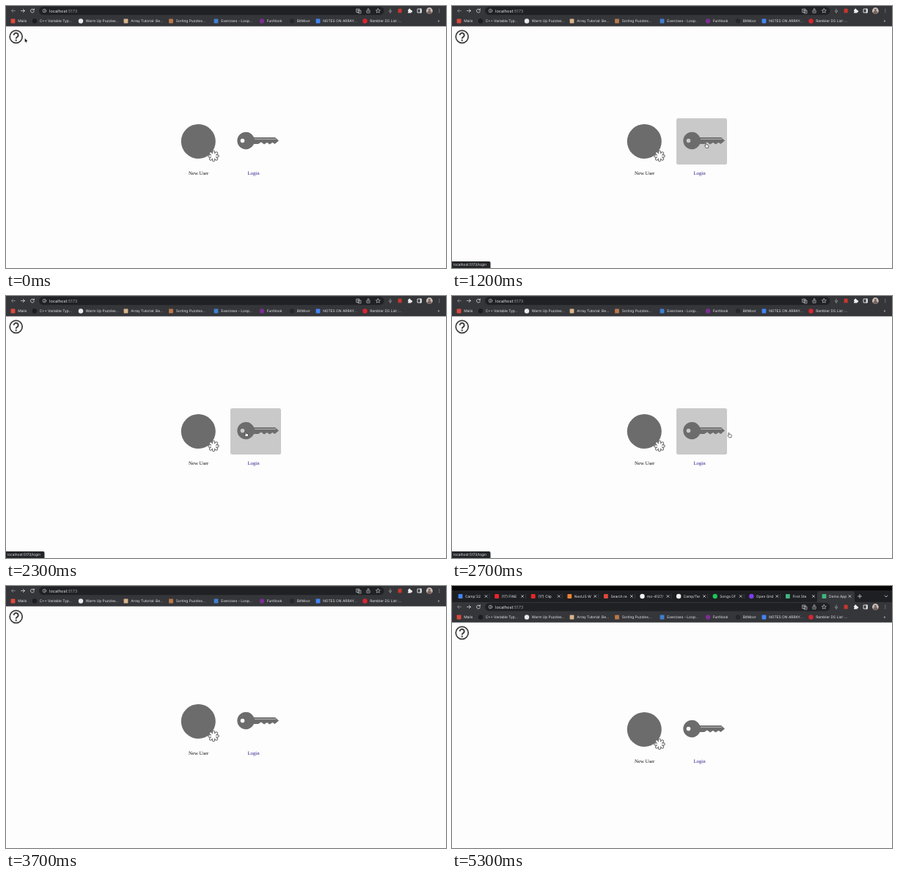
An HTML page that plays this animation: 600 by 357 pixels, repeating every 6 s.

```html
<!DOCTYPE html>
<html lang="en">
<head>
<meta charset="utf-8">
<title>Login page</title>
<style>
html, body { margin: 0; width: 100%; height: 100%; overflow: hidden; background: #fdfdfd; }
svg { display: block; width: 100%; height: 100%; }
text { font: 4.9px Inter, "Open Sans", sans-serif; fill: #e4e5e8; text-rendering: geometricPrecision; white-space: pre; }
.url { font-size: 5.7px; }
.label { font: 6.8px "Liberation Serif", "Times New Roman", serif; fill: #111; }
.link { fill: #2c1a8c; }
.line { fill: none; stroke: #d8d9dc; stroke-width: .8; stroke-linecap: round; stroke-linejoin: round; }
.dim { stroke: #8b8c90; }
.tile { fill: #c9c9c9; }
</style>
</head>
<body>
<svg viewBox="0 0 600 357">
  <rect width="600" height="357" fill="#fdfdfd"/>

  <g id="content">
    <rect id="newTile" class="tile" x="231.3" y="153" width="62.7" height="63" rx="2.5"/>
    <rect id="loginTile" class="tile" x="306" y="153" width="69" height="63" rx="2.5"/>
    <circle cx="262.3" cy="184.5" r="23.5" fill="#6c6c6c"/>
    <g id="badge" stroke-linecap="round"></g>
    <path fill="#6c6c6c" fill-rule="evenodd" d="M338 179H367L372 183.5 366.5 188 363.5 186 359.5 188.5 356 186 352 188.5 348 185.5 344 188H338A11.8 11.8 0 1 1 338 179ZM325.3 183.5A2.8 2.8 0 1 0 319.700 183.5 2.8 2.8 0 1 0 325.3 183.5Z"/>
    <path stroke="#c4c4c4" stroke-width=".9" d="M339 181.3H368"/>
    <text class="label" x="249" y="230.2">New User</text>
    <text class="label link" x="329.4" y="230.2">Login</text>
  </g>

  <g id="tabs"></g>

  <g id="bar">
    <rect width="600" height="27.7" fill="#35363a"/>
    <rect x="45" y="1" width="470.500" height="11.2" rx="5.6" fill="#202124"/>
    <path class="line dim" d="M12.5 6.500H7.500M9.700 4.300L7.500 6.500 9.700 8.700"/>
    <path class="line" d="M20.500 6.500H25.500M23.300 4.300L25.500 6.500 23.300 8.700"/>
    <path class="line" d="M38 5A2.500 2.500 0 1 0 38.400 7.300M38.400 3.800V5.500H36.700"/>
    <g class="line" style="stroke-width:.6">
      <circle cx="52.400" cy="6.500" r="2.300"/>
      <path d="M52.400 6.300V7.700M52.400 5.200V5.300"/>
      <path d="M478 4H482V8.500H478ZM480.500 6H484V10H480.500ZM479 5.500H481"/>
      <path d="M493 6H491.900V9.300H496.100V6H495M494 7.500V3.600M492.800 4.700L494 3.500 495.200 4.700"/>
      <path d="M507.300 3.500L508.200 5.500 510.300 5.700 508.700 7.100 509.200 9.200 507.300 8.100 505.400 9.200 505.900 7.100 504.300 5.700 506.400 5.500Z"/>
      <path class="dim" d="M524 4V6.800M522.300 6.500A1.700 1.700 0 0 0 525.700 6.500M524 8.200V9.500" stroke-width="1"/>
      <path d="M561.500 4H566.500V9H561.500Z" stroke-width="1"/>
      <path d="M565.300 4V9" stroke-width="1.500"/>
    </g>
    <rect x="534.600" y="3.700" width="5" height="5.600" fill="#c8382e"/>
    <path fill="#f1f1f1" d="M548 5H549.200A1.100 1.100 0 1 1 551.300 5H552.500V6.200A1.100 1.100 0 1 1 552.500 8.200V9.500H548V8.300A1.100 1.100 0 0 0 548 6.200Z"/>
    <circle cx="577.400" cy="6.500" r="4.400" fill="#c9bdb8"/>
    <path d="M574.400 9.700A3 3.300 0 0 1 580.400 9.700 4.400 4.400 0 0 1 574.400 9.700Z" fill="#77635e"/>
    <circle cx="577.400" cy="5.300" r="1.500" fill="#77635e"/>
    <path class="line" d="M590.800 4.300V4.350M590.800 6.500V6.550M590.800 8.700V8.750" stroke-width="1.100"/>
    <text class="url" x="59" y="8.600">localhost<tspan fill="#9a9da2">:5173</tspan></text>
    <g id="marks"></g>
    <text x="588.500" y="22.300">»</text>
    <g fill="none" stroke="#3c3c3c" stroke-width="1.700">
      <circle cx="13.700" cy="41.800" r="8.500"/>
      <path stroke-width="2" d="M10.700 39.800A3 2.900 0 1 1 15.400 42.100Q13.700 43 13.700 44.600"/>
      <circle cx="13.700" cy="46.800" r=".4"/>
    </g>
  </g>

  <g id="status">
    <path d="M0 348H50.500Q52.500 348 52.500 350V357H0Z" fill="#242528"/>
    <text x="2" y="354.300" style="font-size:4.800px">localhost:5173/login</text>
  </g>

  <path id="arrow" fill="#000" stroke="#fff" stroke-width=".4" d="M0 0V5.700L1.300 4.600 2.200 6.500 3.100 6.100 2.300 4.200H4Z"/>
  <path id="hand" fill="#fff" stroke="#111" stroke-width=".6" stroke-linejoin="round" d="M-.7 .3Q0-.6.6.3L.9 2 3.300 2.600Q4 3 3.800 4L3.300 6.300H.3L-1.500 3.800Q-1.500 3-.300 3.500Z"/>
</svg>

<script>
const $ = id => document.getElementById(id);

const icon = (x, y, color, round) => round
  ? `<circle cx="${x}" cy="${y}" r="3.2" fill="${color}"/>`
  : `<rect x="${x - 2.9}" y="${y - 2.9}" width="5.8" height="5.8" rx=".7" fill="${color}"/>`;

// icon x, colour, round, title
const marks = [
  [9.5, '#e0483c', 0, 'Mails'],
  [39, '#1c1d20', 1, 'C++ Variable Typ...'],
  [102, '#e9e9ee', 1, 'Warm Up Puzzles...'],
  [163.5, '#d9b48a', 0, 'Array Tutorial: Be...'],
  [225, '#b9784a', 0, 'Sorting Puzzles...'],
  [286.5, '#3f7fd0', 0, 'Exercises - Loop...'],
  [349, '#7a2d91', 1, 'FunNook'],
  [390, '#26272b', 1, 'BitMoor'],
  [425.5, '#4285f4', 0, 'NOTES ON ARRAY...'],
  [489.5, '#d8262f', 1, 'Rambler DS List :...']
];
$('marks').innerHTML = marks.map(([x, color, round, title]) =>
  icon(x, 20.5, color, round) + `<text x="${x + 6.7}" y="22.300">${title}</text>`).join('');

const tabs = [
  ['#4285f4', 0, "Camp'22"], ['#e8252a', 0, '(17) FINE'], ['#e8252a', 0, '(17) Clip'],
  ['#f0822d', 0, 'NextJS W'], ['#e0483c', 0, 'Search re'], ['#f4f4f4', 1, 'mo-4127/'],
  ['#f4f4f4', 1, 'Camp/Ter'], ['#1fc45c', 1, 'Songs Of'], ['#7d3cf0', 1, 'Open Grid'],
  ['#3fb57f', 0, 'First Ste'], ['#3fb57f', 0, 'Demo App']
];
$('tabs').innerHTML = `
  <rect width="600" height="22.5" fill="#1e1f22"/>
  <rect width="600" height="6" fill="#060607"/>
  <path d="M495 22.500Q498 22.500 498 19.500V10Q498 7 501 7H546Q549 7 549 10V19.500Q549 22.500 552 22.500Z" fill="#35363a"/>` +
  tabs.map(([color, round, title], i) => {
    const x = 11.5 + i * 49.6;
    const edge = i < 9 ? `<path d="M${x + 39.5} 10.500V17.500" stroke="#55575c" stroke-width=".5"/>` : '';
    return icon(x, 14, color, round) + edge +
      `<svg x="${x + 6.5}" y="7" width="25" height="14"><text y="8.800">${title}</text></svg>` +
      `<path class="line" d="M${x + 33.5} 12.500l3 3m0-3l-3 3"/>`;
  }).join('') +
  '<path class="line" d="M553.500 14H558.500M556 11.500V16.500M590 13L592 15 594 13"/>';

const petals = (color, width) => [0, 45, 90, 135].map(a =>
  `<path d="M-5.600 0H5.600" transform="translate(283 204.500) rotate(${a})" stroke="${color}" stroke-width="${width}"/>`).join('');
$('badge').innerHTML = petals('#6c6c6c', 4.3) + petals('#fff', 2.2);

// pointer: time, x, y
const path = [
  [0, 25.6, 43.8], [100, 30, 46], [200, 90, 74], [300, 175, 117], [400, 258, 151],
  [500, 298, 166], [600, 272, 169], [700, 246, 171], [800, 264, 176], [900, 292, 181],
  [1000, 322, 185], [1200, 346, 187], [1600, 308, 180], [1700, 278, 177], [1800, 265.5, 176.5],
  [2000, 270, 178], [2100, 290, 181], [2200, 312, 184], [2500, 356, 188], [2700, 377.5, 186.5],
  [2900, 392, 176], [3200, 410, 100], [3500, 426, 17], [3600, 444, 3], [3700, 446, -10]
];
const within = (v, a, b) => v >= a && v < b;
const show = (id, on) => $(id).setAttribute('visibility', on ? 'visible' : 'hidden');
const move = (id, x, y) => $(id).setAttribute('transform', `translate(${x} ${y})`);

function pointer(t) {
  const i = path.findIndex(p => p[0] > t);
  if (i < 0) return [446, -10];
  const [t0, x0, y0] = path[i - 1], [t1, x1, y1] = path[i];
  const k = (t - t0) / (t1 - t0);
  return [x0 + (x1 - x0) * k, y0 + (y1 - y0) * k];
}

function draw(now) {
  const t = Math.floor(now % 6000 / 100) * 100;
  const [x, y] = pointer(t);
  const inRow = within(y, 153, 216);
  const onNew = inRow && within(x, 231, 294);
  const onLogin = inRow && within(x, 306, 378.5);
  show('newTile', onNew);
  show('loginTile', onLogin);
  show('hand', onLogin);
  show('arrow', !onLogin && y > -5);
  show('status', within(t, 1000, 2000) || within(t, 2200, 3100));
  move('hand', x, y);
  move('arrow', x, y);

  const open = t < 4200 ? 0 : t < 4300 ? .6 : 1;
  move('tabs', 0, 22 * (open - 1) - (open ? 0 : 1));
  move('bar', 0, 22 * open);
  move('content', 0, 11 * open);
}

const start = performance.now();
function tick() {
  draw(performance.now() - start);
  requestAnimationFrame(tick);
}
tick();
</script>
</body>
</html>
```
